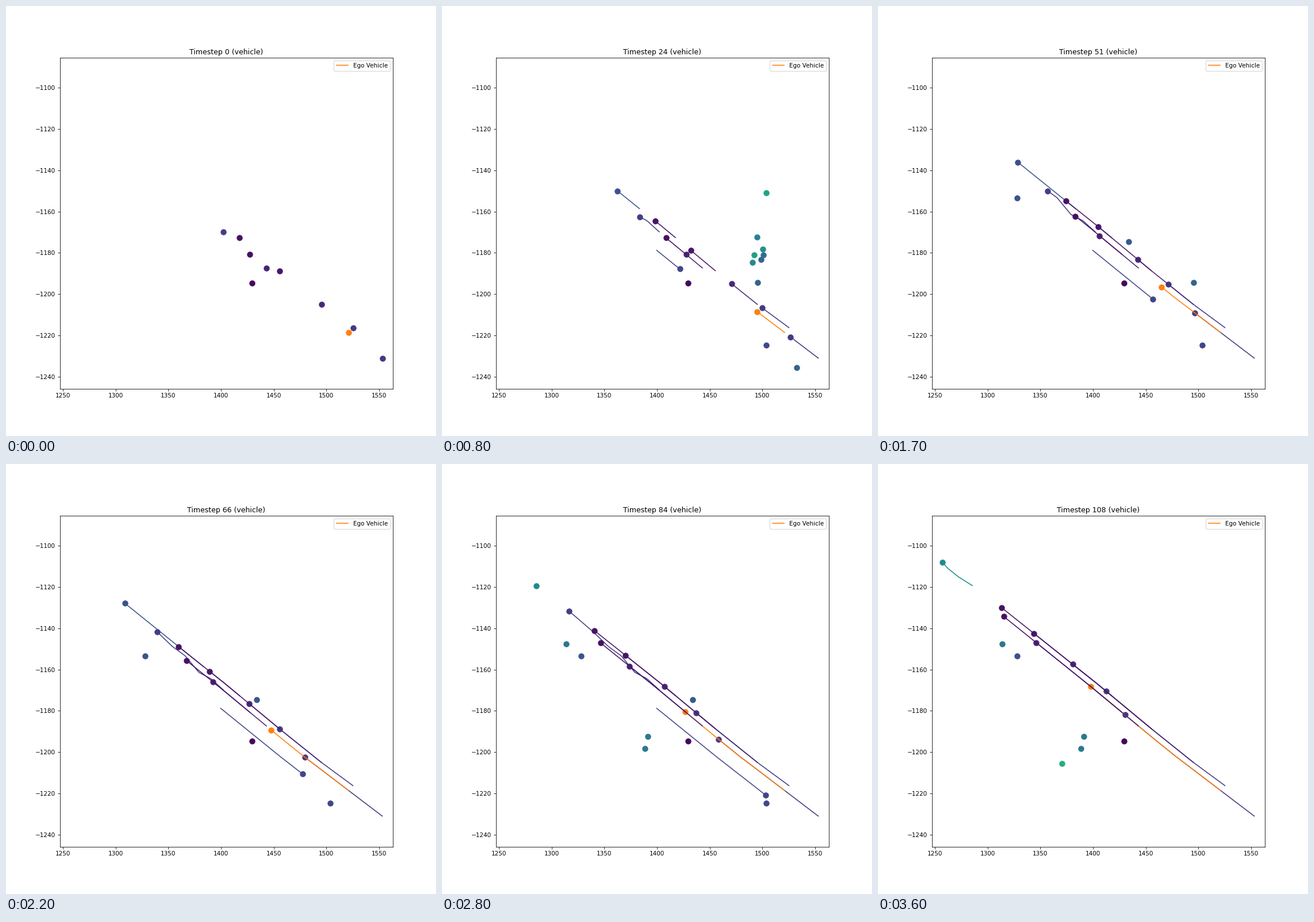
A matplotlib script for the animation above (3.7 s loop, 748 px wide and 748 px high).

```python
import numpy as np
import matplotlib.pyplot as plt
from matplotlib.animation import FuncAnimation

SIZE, INCHES = 748, 10
FRAMES, INTERVAL, STEP = 37, 100, 3
LAST = (FRAMES - 1) * STEP
XLIM, YLIM = (1246.95, 1563.15), (-1245.75, -1085.45)
EGO = "#ff7f0e"

# lane centre lines as stage points, left to right
UPPER = (215, 250), (382, 383), (476, 461), (549, 519.5), (604, 560)
LOWER = (219.5, 266), (370.5, 387.5), (478, 476.5), (517, 508), (655, 613)
ONCOMING = (374, 425.5), (477, 509), (613, 615)
EXIT = (199.5, 236.5), (344, 353)
WEAVE = ((206, 243), (263, 292), (290, 318), (312, 334), (336, 363),
         (357, 374), (378.5, 393.5))
BEND = (112.5, 171.5), (122, 182), (140, 196.5), (164.5, 212)

fig, ax = plt.subplots(figsize=(INCHES, INCHES), dpi=SIZE / INCHES)
ax.set_xlim(XLIM)
ax.set_ylim(YLIM)
title = ax.set_title("")
tracks = []


def to_data(px, py):
    """Convert stage pixels (y down) to axes data coordinates."""
    box = ax.get_position()
    u = ((px - 0.5) / SIZE - box.x0) / box.width
    v = (1 - (py - 0.5) / SIZE - box.y0) / box.height
    return XLIM[0] + u * (XLIM[1] - XLIM[0]), YLIM[0] + v * (YLIM[1] - YLIM[0])


def drive(color, lane, x0, x1, lag=0.0, start=0, end=LAST, label=None):
    """Follow a lane from x0 to x1; a larger lag means a slower start."""
    if not isinstance(color, str):
        color = plt.cm.viridis(color)
    u = np.linspace(0, 1, end - start + 1)
    px = x0 + (x1 - x0) * (u - lag * u * (1 - u))
    x, y = to_data(px, np.interp(px, *zip(*lane)))
    line, = ax.plot([], [], color=color, label=label)
    dot, = ax.plot([], [], "o", color=color, markersize=9)
    tracks.append((start, end, x, y, line, dot))


def park(start, end, *cars):
    for color, x, y in cars:
        drive(color, [(x, y)], x, x, start=start, end=end)


# standing and crawling vehicles
park(18, 27, (0.58, 564.5, 325), (0.57, 543, 433), (0.47, 540.5, 446.5))
park(15, 42, (0.50, 558, 423), (0.37, 559, 433.5), (0.33, 555, 441.5))
park(30, 42, (0.66, 575.5, 338.5))
park(9, 45, (0.32, 617.5, 629.5))
park(12, 57, (0.32, 549, 481.5))
park(45, 96, (0.28, 436.5, 410.5))
park(42, LAST, (0.26, 242.5, 334.5))
park(78, LAST, (0.41, 358, 474.5), (0.41, 354, 495), (0.40, 216.5, 313))
park(96, LAST, (0.62, 321, 521))
park(6, 93, (0.21, 564.5, 590.5))
drive(0.44, ((548, 406), (549.5, 400)), 549.5, 548, start=15, end=39)
drive(0.55, ((539.5, 451), (542, 443)), 542, 539.5, start=27, end=36)

# traffic on the road, later arrivals first
drive(0.48, BEND, 164.5, 112.5, start=84)
drive(0.25, EXIT, 344, 199.5, 0.1, 6, 69)
drive(0.21, ONCOMING, 374, 613, 0.13, 6, 102)
drive(0.18, WEAVE, 378.5, 206, 0.35, 0, 90)
drive(0.17, UPPER, 604, 397.5, -0.02)
drive(0.16, LOWER, 655, 430, 0.05)
drive(EGO, LOWER, 596.5, 370, 0.07, label="Ego Vehicle")
drive(0.11, UPPER, 549, 339, 0.05)
drive(0.10, LOWER, 453.5, 275.5, 0.37)
drive(0.06, UPPER, 476, 272, 0.07)
drive(0.05, UPPER, 406.5, 215, 0.24)
drive(0.04, LOWER, 425, 219.5, 0.31)
park(0, LAST, (0.02, 428, 482))

ax.legend(loc="upper right")


def draw(frame):
    now = frame * STEP
    title.set_text(f"Timestep {now} (vehicle)")
    for start, end, x, y, line, dot in tracks:
        n = now - start + 1 if start <= now <= end else 0
        line.set_data(x[:n], y[:n])
        dot.set_data(x[:n][-1:], y[:n][-1:])
    return [title]


anim = FuncAnimation(fig, draw, frames=FRAMES, interval=INTERVAL,
                     repeat=True, repeat_delay=0)
plt.show()
```
